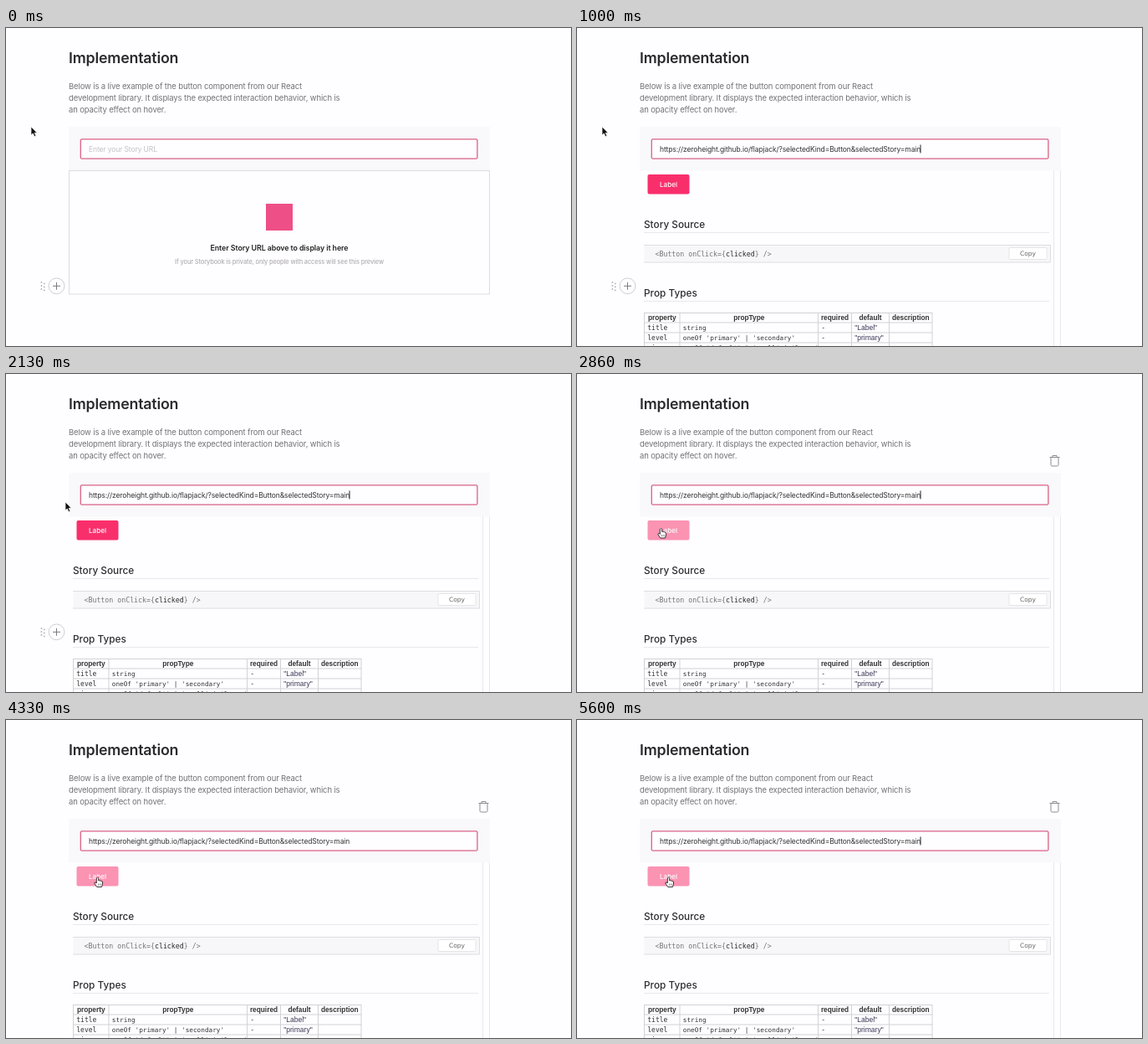
Recreate the animation shown at these times as an HTML page. Size 676x380 px, loop 5.67 s.

```html
<!DOCTYPE html>
<html lang="en">
<head>
<meta charset="utf-8">
<title>Story embed</title>
<style>
  html, body { margin: 0; width: 100%; height: 100%; overflow: hidden; background: #fefdff; }
  svg { display: block; width: 676px; height: 380px; }
  text { font-family: Inter, "Open Sans", sans-serif; white-space: pre; }
  .title { font-size: 17.8px; font-weight: 600; letter-spacing: -.18px; fill: #2b2b2d; }
  .body { font-size: 9.5px; letter-spacing: -.13px; fill: #737275; }
  .field { font-size: 8.5px; letter-spacing: -.11px; fill: #333; }
  .hint { fill: #c3c1c5; }
  .strong { font-size: 8.8px; font-weight: 600; letter-spacing: -.06px; fill: #222; text-anchor: middle; }
  .note { font-size: 7.4px; font-weight: 500; letter-spacing: -.105px; fill: #b0aeb2; text-anchor: middle; }
  .head { font-size: 11.8px; font-weight: 500; fill: #2e2e30; }
  .label { font-size: 8.1px; font-weight: 500; fill: #fff; text-anchor: middle; }
  .code { font-family: "DejaVu Sans Mono", monospace; font-size: 8.25px; fill: #777; }
  .code tspan { fill: #2c2c2c; }
  .copy { font-family: "DejaVu Sans", sans-serif; font-size: 7.5px; fill: #666; text-anchor: middle; }
  .th { font-family: "Liberation Sans", Arial, sans-serif; font-size: 8.3px; font-weight: 700; fill: #333; text-anchor: middle; }
  .prop { font-family: "DejaVu Sans Mono", monospace; font-size: 8px; fill: #333; }
  .type { font-family: "DejaVu Sans Mono", monospace; font-size: 7.7px; fill: #333; }
  .value { font-family: "Liberation Sans", Arial, sans-serif; font-size: 8.5px; fill: #3a3654; }
  .line { fill: none; stroke: #e9e7ea; }
</style>
</head>
<body>
<svg viewBox="0 0 676 380" aria-label="Embedding a story in a page">
  <text class="title" x="75" y="42">Implementation</text>
  <text class="body" x="75" y="73.4">Below is a live example of the button component from our React</text>
  <text class="body" x="75" y="87.4">development library. It displays the expected interaction behavior, which is</text>
  <text class="body" x="75" y="101.4">an opacity effect on hover.</text>

  <g id="trash" fill="none" stroke="#8d8b8f">
    <path d="M565.5 99.5H577.5M569 99V97.5H574V99M567 100V108.5Q567 110 568.5 110H574.5Q576 110 576 108.5V100"/>
  </g>

  <rect x="75" y="118" width="504" height="52.5" fill="#f9f8fa"/>
  <rect x="89.3" y="132.9" width="474.6" height="23.3" rx="1.5" fill="#fefdff" stroke="#da6286" stroke-width="1.3"/>
  <text id="hint" class="field hint" x="99" y="147.5">Enter your Story URL</text>
  <text id="url" class="field" x="99" y="147.5">https://zeroheight.github.io/flapjack/?selectedKind=Button&amp;selectedStory=main</text>
  <path id="caret" d="M411 139.5V149.5" stroke="#222"/>

  <g id="empty">
    <rect x="75.5" y="170.5" width="503" height="147.5" fill="#fefdff" stroke="#dddbdf"/>
    <rect x="311" y="210" width="32" height="32" fill="#ee4f86"/>
    <text class="strong" x="327" y="266">Enter Story URL above to display it here</text>
    <text class="note" x="327" y="281.5">If your Storybook is private, only people with access will see this preview</text>
  </g>

  <g id="story">
    <path class="line" d="M570.5 170.5V380M578.5 170.5V380"/>
    <g id="button">
      <rect x="84.5" y="175" width="50" height="23.4" rx="2" fill="#f92f6c"/>
      <text class="label" x="109.5" y="189.8">Label</text>
    </g>
    <text class="head" x="80" y="238.5">Story Source</text>
    <path class="line" d="M80 244.5H565M80 326.5H565"/>
    <rect x="80.5" y="259.5" width="486" height="20.5" fill="#f7f6f8"/>
    <path d="M80 259.5H566.5V280H80" fill="none" stroke="#dedde0"/>
    <text class="code" x="93.5" y="272.5">&lt;Button onClick={<tspan>clicked</tspan>} /&gt;</text>
    <rect x="517" y="262.5" width="45" height="14" rx="1" fill="#fff" stroke="#e6e4e7"/>
    <text class="copy" x="539.5" y="272">Copy</text>
    <text class="head" x="80" y="320.5">Prop Types</text>
    <g id="table"></g>
  </g>

  <g id="tools">
    <g id="handle" fill="#b3b1b5"></g>
    <circle cx="60.5" cy="308.3" r="9.4" fill="#fefdff" stroke="#cfcdd1"/>
    <path d="M56 308.3H65M60.5 303.8V312.8" stroke="#7b797d"/>
  </g>

  <g id="arrow">
    <path d="M0 0V10L2.3 8L4 11.8L5.8 11L4.2 7.3H7.2Z" fill="#111" stroke="#fff" stroke-width=".7"/>
  </g>
  <g id="hand">
    <path d="M-1.2 .8Q0 -.7 1.2 .8V4Q2.2 3.3 3 4.2Q4 3.7 4.6 4.7Q6 4.4 6 6V8.2L5 11.5H-.8L-3.6 7.2Q-3.8 5.6 -2.2 6L-1.2 7Z" fill="#fff" stroke="#222" stroke-width=".9" stroke-linejoin="round"/>
    <path d="M1 7.5V9.8M2.7 7.5V9.8M4.3 7.5V9.8" stroke="#555" stroke-width=".6"/>
  </g>
</svg>
<script>
const LOOP = 5670;
const PASTE = 530, LOAD = 800, ENTER = 2200, HOVER = 2400, FADE = 130;
// time, x, y of the pointer's hot spot
const PATH = [
  [1660, 30, 118], [1860, 38, 126], [2130, 71, 153], [2400, 88, 172.5],
  [2600, 96, 181], [2860, 100.5, 184.5], [3130, 109.5, 188]
];
const $ = id => document.getElementById(id);

function add(parent, name, attrs, text = '') {
  const el = document.createElementNS('http://www.w3.org/2000/svg', name);
  for (const key in attrs) el.setAttribute(key, attrs[key]);
  el.textContent = text;
  parent.append(el);
}

function buildTable() {
  const table = $('table');
  const edges = [80.5, 123, 288.5, 328.5, 373.5, 425];
  const heads = ['property', 'propType', 'required', 'default', 'description'];
  const rows = [
    ['title', 'string', '-', '"Label"'],
    ['level', "oneOf 'primary' | 'secondary'", '-', '"primary"'],
    ['size', "oneOf 'default' | 'small' | 'large'"]
  ];
  const styles = ['prop', 'type', 'prop', 'value'];
  const lines = edges.map(x => `M${x} 340.5V380`).join('')
    + [340.5, 352, 364, 376].map(y => `M80 ${y}H425.5`).join('');
  add(table, 'path', { d: lines, fill: 'none', stroke: '#d3d1d5' });
  heads.forEach((name, i) =>
    add(table, 'text', { class: 'th', x: (edges[i] + edges[i + 1]) / 2, y: 349 }, name));
  rows.forEach((row, r) => row.forEach((cell, c) =>
    add(table, 'text', { class: styles[c], x: edges[c] + 3.8, y: 360.7 + r * 12 }, cell)));
}

function buildHandle() {
  for (let i = 0; i < 6; i++)
    add($('handle'), 'circle', { cx: 42.4 + i % 2 * 3.4, cy: 304 + (i >> 1) * 4 + i % 2 * 1.4, r: .9 });
}

function pointer(t) {
  if (t <= PATH[0][0]) return PATH[0].slice(1);
  const i = PATH.findIndex(p => p[0] > t);
  if (i < 0) return PATH[PATH.length - 1].slice(1);
  const [t0, x0, y0] = PATH[i - 1], [t1, x1, y1] = PATH[i];
  const k = (t - t0) / (t1 - t0);
  return [x0 + (x1 - x0) * k, y0 + (y1 - y0) * k];
}

function snap(t) {
  const rest = t % 200;
  return t - rest + (rest < 60 ? 0 : rest < 130 ? 60 : 130);
}

function show(id, on) {
  $(id).style.display = on ? '' : 'none';
}

function draw(t) {
  const pasted = t >= PASTE, loaded = t >= LOAD, inside = t >= ENTER, over = t >= HOVER;
  show('hint', !pasted);
  show('url', pasted);
  show('caret', pasted && (t + 500) % 1000 < 670);
  show('empty', !loaded);
  show('story', loaded);
  show('tools', !inside);
  show('trash', inside);
  show('arrow', !over);
  show('hand', over);
  const fade = Math.min(1, Math.max(0, (t - HOVER) / FADE));
  $('button').style.opacity = 1 - .49 * fade;
  const at = `translate(${pointer(t).join(' ')})`;
  $('arrow').setAttribute('transform', at);
  $('hand').setAttribute('transform', at);
}

buildTable();
buildHandle();
draw(0);
const start = performance.now();
function tick() {
  draw(snap((performance.now() - start) % LOOP));
  requestAnimationFrame(tick);
}
requestAnimationFrame(tick);
</script>
</body>
</html>
```
